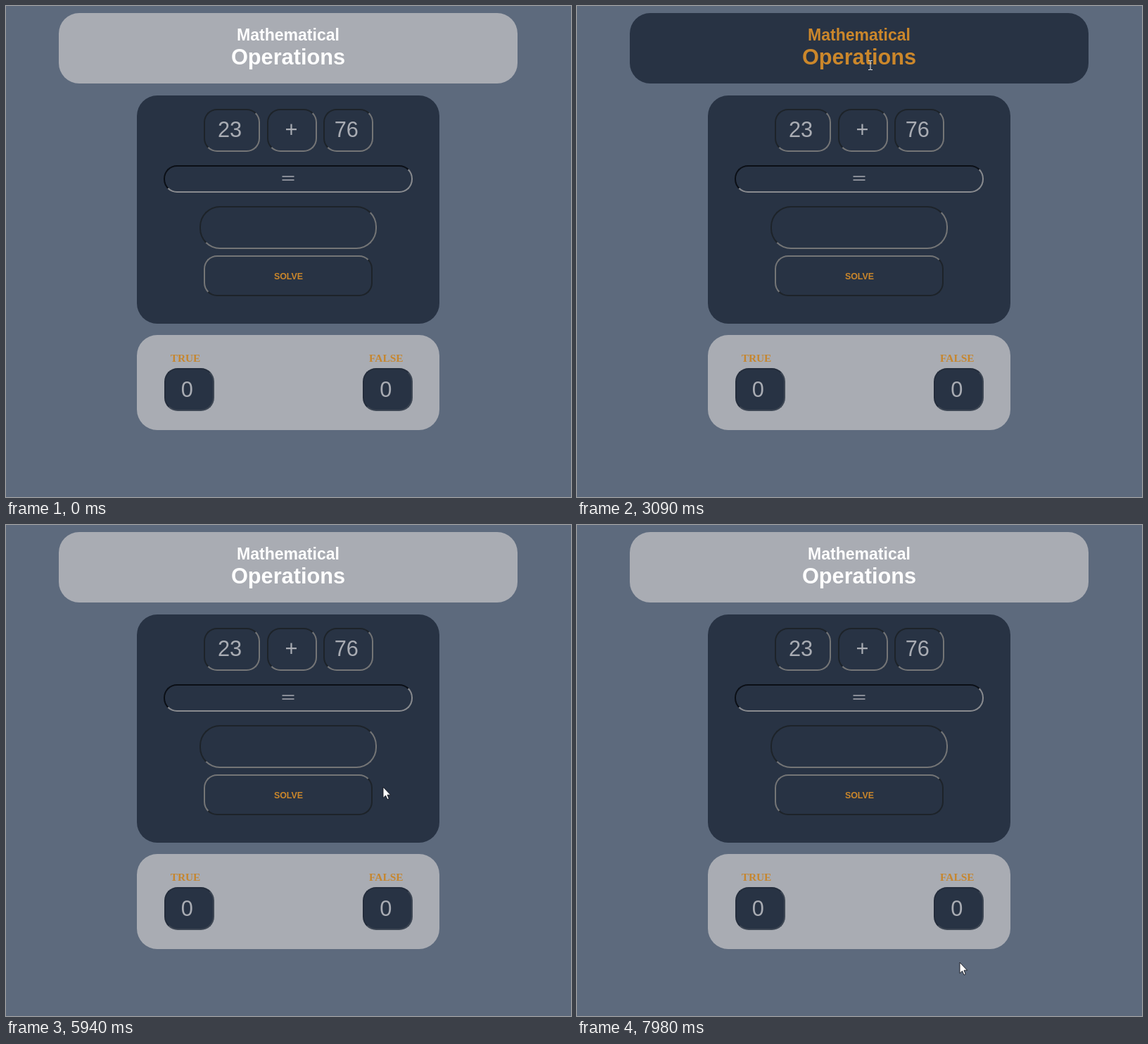
Animation of 803x697 px, one loop 8 s. Source, as an HTML page:

```html
<!DOCTYPE html>
<html lang="en">
<head>
<meta charset="utf-8">
<title>Mathematical Operations</title>
<style>
  :root { --dark: #283344; --grey: #a9acb3; --orange: #cb872b; --rem: 15.36px; }
  html, body { margin: 0; width: 100%; height: 100%; overflow: hidden; background: #5d6a7d; }
  .box { position: absolute; box-sizing: border-box; }
  .card { border-radius: 29px; background: var(--grey); }
  .dark, .hover { background: var(--dark); }
  .field {
    --lo: #1d2329; --hi: #747576;
    border: 2px solid; border-color: var(--lo) var(--hi) var(--hi) var(--lo);
    border-radius: 19px; background: var(--dark);
  }
  .bar { --lo: #0b0f16; --hi: #898b8f; }
  .answer { border-radius: 29px; }
  .score { --lo: #232c3b; --hi: #3e4754; }
  .button { --lo: #747576; --hi: #1d2329; }
  .button.hover { --lo: #a87c42; --hi: #4a3820; }
  svg { position: absolute; left: 0; top: 0; }
  text { font-family: "Liberation Sans", Arial, sans-serif; }
  .title { font-weight: bold; font-size: calc(1.5 * var(--rem)); fill: #fff; }
  .big { font-size: calc(2 * var(--rem)); }
  .title.hover { fill: var(--orange); }
  .num { font-size: calc(2 * var(--rem)); fill: var(--grey); }
  .solve { font-size: 12.4px; font-weight: bold; fill: var(--orange); }
  .label { font: bold var(--rem) "Liberation Serif", Times, serif; fill: #c6862e; }
</style>
</head>
<body>
<svg id="art" width="803" height="697">
  <g text-anchor="middle">
    <text class="title" x="401" y="49">Mathematical</text>
    <text class="title big" x="401" y="83">Operations</text>
    <text class="num" x="318" y="186">23</text>
    <text class="num" x="405.5" y="186">+</text>
    <text class="num" x="483.8" y="186">76</text>
    <text class="solve" x="401.5" y="387.5">SOLVE</text>
    <text class="label" x="255" y="505">TRUE</text>
    <text class="label" x="540.3" y="505">FALSE</text>
    <text class="num" x="257.3" y="555">0</text>
    <text class="num" x="539.7" y="555">0</text>
  </g>
  <path d="M392.5 242H409.5M392.5 247H409.5" stroke="#a9acb3" stroke-width="1.6"/>
  <path id="arrow" d="M0 0V15.4L3.6 12.1 6 17.6 8.3 16.6 6 11.2H10.6Z" fill="#fff" stroke="#10141c" stroke-width=".9"/>
  <path id="beam" d="M-3 -6.5H-1L0 -6 1 -6.5H3M0 -6V6M-3 6.5H-1L0 6 1 6.5H3" fill="none" stroke="#e4e4e4"/>
</svg>
<script>
const LOOP = 8000, START = 190, STEP = 69.05, MIDDLE = 401;
const byId = id => document.getElementById(id);
const art = byId('art'), arrow = byId('arrow'), beam = byId('beam');
const titles = document.querySelectorAll('.title');

function box(kind, x, y, w, h) {
  const el = document.createElement('div');
  el.className = 'box ' + kind;
  el.style.cssText = `left:${x}px;top:${y}px;width:${w}px;height:${h}px`;
  document.body.insertBefore(el, art);
  return { el, x, y, w, h };
}
const centred = (kind, y, w, h) => box(kind, Math.round(MIDDLE - w / 2), y, w, h);

const header = centred('card', 10, 652, 100);
centred('card dark', 127, 430, 324);
for (const [x, w] of [[281, 80], [371, 71], [451, 71]]) box('field', x, 146, w, 61);
centred('field bar', 226, 354, 39);
centred('field answer', 284, 252, 61);
const button = centred('field button', 354, 240, 58);
const panel = centred('card', 467, 430, 135);
for (const side of [-1, 1]) box('field score', MIDDLE + side * 141 - 35.5, 514, 71, 61);

// Pointer waypoints: step, x, y
const route = [
  [0, 776, 688], [10, 733, 269], [20, 307, 660], [23, 134, 527], [29, 142, 122],
  [35, 180, 85], [42, 417, 84], [50, 497, 86], [59, 330, 88], [62, 218, 127],
  [71, 269, 247], [83, 536, 372], [85, 515, 394], [90, 515, 394], [97, 658, 512],
  [102, 595, 545], [107, 578, 549], [113, 544, 621]
];

function pointer(step) {
  const i = Math.max(1, route.findIndex(p => p[0] >= step));
  const [s0, x0, y0] = route[i - 1], [s1, x1, y1] = route[i];
  const k = (step - s0) / (s1 - s0);
  return [x0 + (x1 - x0) * k, y0 + (y1 - y0) * k];
}

const inside = (r, x, y) => x >= r.x && x < r.x + r.w && y >= r.y && y < r.y + r.h;
const titleArea = { x: 320, y: 28, w: 162, h: 62 };

function place(el, shown, x, y) {
  el.style.display = shown ? '' : 'none';
  el.setAttribute('transform', `translate(${Math.round(x)} ${Math.round(y)})`);
}

function draw(time) {
  const step = Math.floor((time - START) / STEP + 0.25);
  const visible = time >= START;
  const [x, y] = pointer(Math.max(0, step));
  const hovered = area => visible && inside(area, x, y);
  for (const area of [header, button, panel]) area.el.classList.toggle('hover', hovered(area));
  titles.forEach(t => t.classList.toggle('hover', hovered(header)));
  place(arrow, visible && !inside(titleArea, x, y), x, y);
  place(beam, hovered(titleArea), x, y);
}

const began = performance.now();
function tick() {
  draw((performance.now() - began) % LOOP);
  requestAnimationFrame(tick);
}
tick();
</script>
</body>
</html>
```
